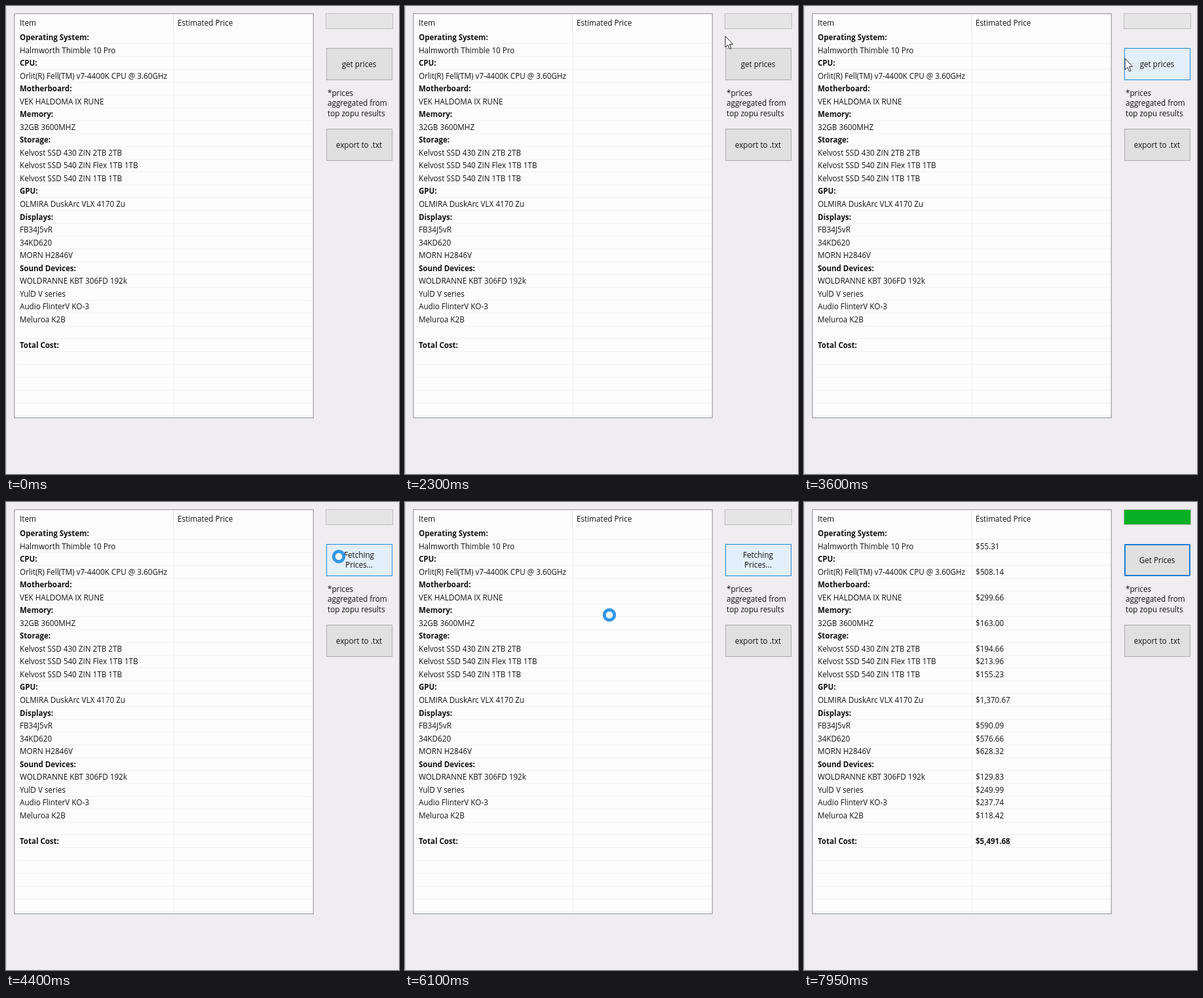
Animation of 600 by 713 pixels, one loop 8 s. Source, as an HTML page with a canvas:

```html
<!DOCTYPE html>
<html lang="en">
<head>
<meta charset="utf-8">
<title>Parts price list</title>
<style>
html, body { margin: 0; width: 100%; height: 100%; overflow: hidden; background: #efedef; }
canvas { display: block; }
</style>
</head>
<body>
<canvas id="stage" width="600" height="713"></canvas>
<script>
const ctx = document.getElementById('stage').getContext('2d');
const LOOP = 8000, STEP = 50, ROW = 19.54;
const APPEAR = 1850, HOVER = 3550, CLICK = 4000, DONE = 6200;
const FONT = '"Open Sans", "Noto Sans", sans-serif';

// Each row: text, then a price; rows without a price are headings.
const rows = [
  ['Operating System:'],
  ['Halmworth Thimble 10 Pro', '$55.31'],
  ['CPU:'],
  ['Orlit(R) Fell(TM) v7-4400K CPU @ 3.60GHz', '$508.14'],
  ['Motherboard:'],
  ['VEK HALDOMA IX RUNE', '$299.66'],
  ['Memory:'],
  ['32GB 3600MHZ', '$163.00'],
  ['Storage:'],
  ['Kelvost SSD 430 ZIN 2TB 2TB', '$194.66'],
  ['Kelvost SSD 540 ZIN Flex 1TB 1TB', '$213.96'],
  ['Kelvost SSD 540 ZIN 1TB 1TB', '$155.23'],
  ['GPU:'],
  ['OLMIRA DuskArc VLX 4170 Zu', '$1,370.67'],
  ['Displays:'],
  ['FB34J5vR', '$590.09'],
  ['34KD620', '$576.66'],
  ['MORN H2846V', '$628.32'],
  ['Sound Devices:'],
  ['WOLDRANNE KBT 306FD 192k', '$129.83'],
  ['YulD V series', '$249.99'],
  ['Audio FlinterV KO-3', '$237.74'],
  ['Meluroa K2B', '$118.42'],
  [''],
  ['Total Cost:']
];

const clamp = v => Math.min(1, Math.max(0, v));
const ease = v => v * v * (3 - 2 * v);

function rect(x, y, w, h, color) {
  ctx.fillStyle = color;
  ctx.fillRect(x, y, w, h);
}

function box(x, y, w, h, fill, border, line = 1) {
  rect(x, y, w, h, border);
  rect(x + line, y + line, w - 2 * line, h - 2 * line, fill);
}

function text(str, x, y, { bold = false, align = 'left' } = {}) {
  ctx.font = bold ? `bold 11.5px ${FONT}` : `11.7px ${FONT}`;
  ctx.textAlign = align;
  ctx.fillStyle = '#111';
  ctx.fillText(str, x, y);
}

function drawList(done) {
  box(12.4, 11.2, 457.3, 616.6, '#fefdfe', '#8b8d91');
  for (let k = 0; k < 30; k++) rect(16, 57 + k * ROW, 452, 1, '#f0eff1');
  rect(256, 38, 1, 587, '#eeedef');
  rect(255, 13, 1, 25, '#e4e3e5');
  text('Item', 21, 29.5);
  text('Estimated Price', 262, 29.5);
  rows.forEach(([label, price], i) => {
    const y = 52 + i * ROW;
    text(label, 21, y, { bold: !price });
    if (done && price) text(price, 262, y);
  });
  if (done) text('$5,491.68', 262, 52 + 24 * ROW, { bold: true });
}

function drawButton(y, lines, fill, border, line) {
  box(489, y, 101, 49, fill, border, line);
  const base = y + 28.5 - (lines.length - 1) * 7.7;
  lines.forEach((s, i) => text(s, 539, base + i * 15.4, { align: 'center' }));
}

function drawPanel(t) {
  box(488, 11, 103, 24, '#e6e5e6', '#bebdbe');
  const fill = ease(clamp((t - DONE) / 600));
  if (fill > 0) rect(489, 12, 101 * fill, 22, '#06b025');

  if (t < HOVER) drawButton(64, ['get prices'], '#e1e0e1', '#adacad');
  else if (t < CLICK) drawButton(64, ['get prices'], '#e3effa', '#2586d5');
  else if (t < DONE) drawButton(64, ['Fetching', 'Prices...'], '#e3effa', '#2586d5');
  else drawButton(64, ['Get Prices'], '#e1e0e1', '#1a7fd4', 2);

  ['*prices', 'aggregated from', 'top zopu results']
    .forEach((s, i) => text(s, 491, 136.5 + i * 15.5));
  drawButton(187, ['export to .txt'], '#e1e0e1', '#adacad');
}

function drawArrow(x, y) {
  const shape = [[0, 0], [0, 17], [3.9, 13.4], [6.6, 19.5], [9, 18.5], [6.4, 12.5], [11.6, 12.2]];
  ctx.beginPath();
  shape.forEach(([dx, dy]) => ctx.lineTo(x + dx, y + dy));
  ctx.closePath();
  ctx.fillStyle = '#fff';
  ctx.fill();
  ctx.lineWidth = 1;
  ctx.strokeStyle = '#222';
  ctx.stroke();
}

function drawSpinner(x, y) {
  ctx.beginPath();
  ctx.arc(x, y, 7.8, 0, 2 * Math.PI);
  ctx.fillStyle = '#f8fcff';
  ctx.fill();
  ctx.lineWidth = 5;
  ctx.strokeStyle = '#3498e4';
  ctx.stroke();
}

// Pointer path as [time, x, y] stops, eased between neighbours.
const path = [
  [APPEAR, 530, 42], [2250, 489, 46], [3400, 489, 46], [3600, 490, 80],
  [3800, 490, 80], [CLICK, 508, 83], [4400, 508, 83], [4900, 312, 172]
];

function pointerAt(t) {
  const i = path.findIndex(p => p[0] > t);
  if (i < 0) return path[path.length - 1].slice(1);
  const [t0, x0, y0] = path[i - 1], [t1, x1, y1] = path[i];
  const k = ease((t - t0) / (t1 - t0));
  return [x0 + (x1 - x0) * k, y0 + (y1 - y0) * k];
}

function draw(t) {
  rect(0, 0, 600, 713, '#efedef');
  rect(0, 0, 1, 713, '#d6d5d6');
  drawList(t >= DONE);
  drawPanel(t);
  if (t >= APPEAR && t < DONE) (t < CLICK ? drawArrow : drawSpinner)(...pointerAt(t));
}

function tick() {
  const t = performance.now() % LOOP;
  draw(Math.floor(t / STEP) * STEP);
  requestAnimationFrame(tick);
}
tick();
</script>
</body>
</html>
```
